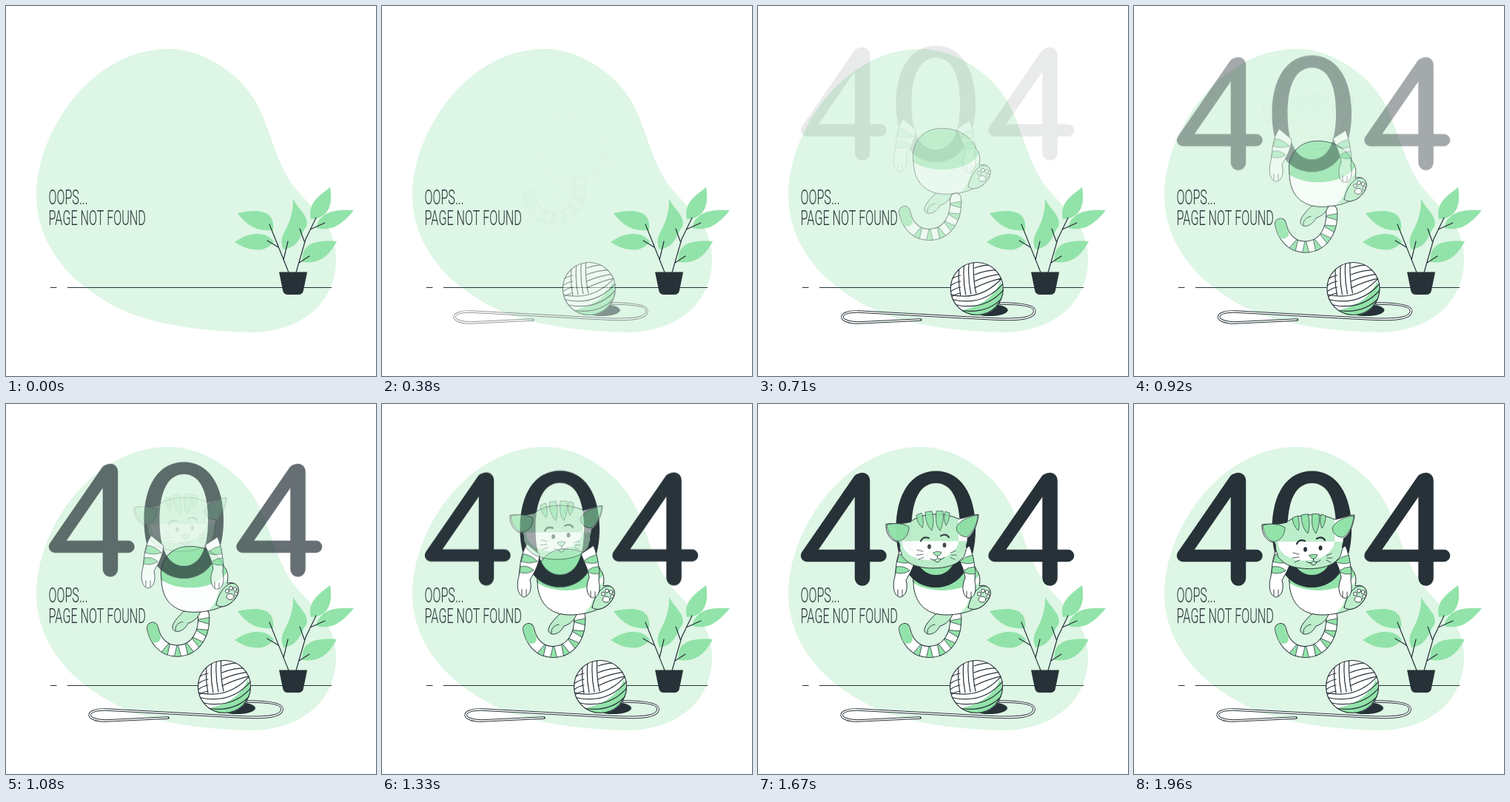
These frames come from a looping animation (500x500 px, 2000 ms). An HTML page:

```html
<!DOCTYPE html>
<html lang="en">
<head>
<meta charset="utf-8">
<title>Page not found</title>
<style>
  html, body { margin: 0; width: 100%; height: 100%; overflow: hidden; background: #fff; }
  svg { display: block; width: 100vw; height: 100vh; }
  .mint { fill: #92e3a9; }
  .tint { fill: #bdeecb; }
  .ink { fill: #263238; }
  .line { fill: none; stroke: #263238; stroke-linecap: round; stroke-linejoin: round; }
  .skin { fill: #fff; stroke: #263238; stroke-linejoin: round; stroke-linecap: round; }
  .spot { fill: #92e3a9; stroke: #263238; stroke-width: .7; stroke-linejoin: round; }
  .sign { font: 300 28px Roboto, "Open Sans", sans-serif; transform: scaleX(.578); }
</style>
</head>
<body>
<svg viewBox="0 0 500 500">
  <defs>
    <clipPath id="ballClip"><circle cx="295" cy="382" r="36"/></clipPath>
    <path id="torso" d="M210 240C206 220 219 196 248 196C276 196 291 212 295 224C301 230 300 240 299 246C307 243 315 248 314 257C312 268 302 277 290 278C282 282 268 285 254 285C226 285 210 268 210 240Z"/>
    <clipPath id="torsoClip"><use href="#torso"/></clipPath>
    <path id="skull" d="M206 160C193 164 183 161 173 163C172 174 179 187 190 187C193 192 190 197 194 202C193 206 197 209 200 212C213 226 262 227 275 210C281 206 279 201 282 196C280 191 284 187 283 182C292 176 297 162 298 150C289 150 280 155 271 156C253 147 221 147 206 160Z"/>
    <clipPath id="skullClip"><use href="#skull"/></clipPath>
    <path id="tailPath" d="M267 286C269 312 256 335 231 335C211 335 201 319 198 304"/>
    <path id="thread" d="M219 424L135 428C106 428 106 412 135 413L300 422C345 425 373 424 373 412C373 404 350 402 326 402"/>
  </defs>

  <path fill="#def6e5" d="M220 58C265 58 308 88 330 118C358 157 361 212 394 250C420 280 446 298 446 342C446 402 398 441 330 441C280 440 214 434 165 414C96 384 41 330 41 255C43 165 118 58 220 58Z"/>
  <path class="line" style="stroke-linecap:butt" d="M60 380.500H68.500M83 380.500H440"/>

  <g class="mint">
    <path d="M313 280C340 274 364 275 361 303C338 305 325 296 313 280Z"/>
    <path d="M309 319C328 305 352 303 362 319C349 335 327 331 309 319Z"/>
    <path d="M388 261C396 276 410 284 406 298C399 305 398 326 375 329C365 307 388 303 388 261Z"/>
    <path d="M438 245C442 267 437 287 412 288C407 266 424 256 438 245Z"/>
    <path d="M470 276C455 294 442 305 419 300C425 276 446 275 470 276Z"/>
    <path d="M447 318C437 337 424 349 401 346C397 320 421 316 447 318Z"/>
  </g>
  <path class="line" stroke-width="1.200" d="M382 360L356 295M368 326L353 317M375 343L381 318M392 360L405 315L419 286M396 347L410 338M403 318L397 301M411 302L431 293"/>
  <path class="ink" d="M369 359.500H407L402 384Q401 390 395 390H381Q375 390 374 384Z"/>

  <g class="ink">
    <text class="sign" x="99.500" y="268">OOPS...</text>
    <text class="sign" x="99.500" y="296">PAGE NOT FOUND</text>
  </g>

  <g id="yarn">
    <ellipse class="ink" cx="312" cy="411" rx="25" ry="8"/>
    <use href="#thread" class="line" stroke-width="3.600"/>
    <use href="#thread" fill="none" stroke="#fff" stroke-width="1.700"/>
    <circle cx="295" cy="382" r="36" fill="#fff"/>
    <g clip-path="url(#ballClip)">
      <path class="mint" d="M264 413Q314 406 327 372L340 420H264Z"/>
      <path id="strands" class="line" stroke-width="1.200"/>
    </g>
    <circle class="line" cx="295" cy="382" r="35.500" stroke-width="1.200"/>
  </g>

  <g id="tail">
    <use href="#tailPath" class="line" stroke-width="16"/>
    <use href="#tailPath" fill="none" stroke="#fff" stroke-width="14" stroke-linecap="round"/>
    <path fill="none" stroke="#92e3a9" stroke-width="14" stroke-linecap="round" d="M202 317Q199 311 198 304"/>
    <g id="rings"></g>
  </g>

  <g id="body">
    <path class="skin tint" style="fill:#bdeecb" d="M240 284C232 292 224 300 225 307C228 314 240 312 246 300C254 298 261 291 263 284Z"/>
    <path class="line" stroke-width=".9" d="M229 310C228 304 232 299 239 298"/>
    <use href="#torso" fill="#fff"/>
    <g clip-path="url(#torsoClip)">
      <ellipse class="mint" cx="249" cy="220" rx="53" ry="32"/>
      <path class="tint" d="M320 225V290H262Q282 279 286 262Q290 249 299 240Z"/>
    </g>
    <use href="#torso" class="line"/>
    <path class="skin" style="fill:#bdeecb" d="M284 275C286 263 294 249 304 246C313 245 317 254 312 263C306 273 293 282 284 275Z"/>
    <g class="skin" stroke-width=".9">
      <ellipse cx="303" cy="264" rx="5" ry="4"/>
      <circle cx="299" cy="256.500" r="2.500"/>
      <circle cx="304" cy="252.500" r="2.500"/>
      <circle cx="309.500" cy="254" r="2.500"/>
      <circle cx="311" cy="260" r="2.300"/>
    </g>
  </g>

  <g id="digits">
    <g id="four" class="line">
      <path stroke-width="16.500" d="M165.500 205H66L137 102"/>
      <path stroke-width="20.500" d="M141 103V235.500"/>
    </g>
    <use href="#four" x="253.500"/>
    <path class="ink" fill-rule="evenodd" d="M240.500 90.500C274 90.500 294 122 294 169S274 248 240.500 248S186.500 217 186.500 169S207 90.500 240.500 90.500ZM240.500 107C219 107 207.500 130 207.500 169S219 231 240.500 231S273 208 273 169S262 107 240.500 107Z"/>
    <path class="skin" d="M196 190C187 203 187 218 185 233C181 247 184 260 192 261C200 260 203 249 200 238C205 229 212 219 213 204Z"/>
    <path class="spot" d="M191 203Q201 204 210 213Q199 217 188 213ZM187 220Q197 218 205 225Q197 231 186 228Z"/>
    <path class="line" stroke-width=".9" d="M189 259V251M195 259V251"/>
    <path class="skin" d="M269 203C274 216 279 225 280 235C275 245 276 258 283 262C292 264 296 253 293 240C294 224 292 207 286 192Z"/>
    <path class="spot" d="M290 204Q280 206 272 213Q283 218 292 214ZM293 220Q284 220 277 226Q285 232 294 229Z"/>
    <path class="line" stroke-width=".9" d="M282 261V253M288 262V254"/>
  </g>

  <g id="head">
    <use href="#skull" fill="#fff"/>
    <path class="tint" clip-path="url(#skullClip)" fill-rule="evenodd" d="M186 186H290V230H186ZM195 188A38 25 -4 0 0 271 185V150H195Z"/>
    <use href="#skull" class="line"/>
    <path class="spot" d="M174 164C184 161 197 162 204 167C204 178 197 185 190 186C180 185 175 174 174 164Z"/>
    <path class="spot" d="M297 151C285 152 271 159 268 168C269 177 277 181 283 180C291 174 296 163 297 151Z"/>
  </g>

  <g id="face">
    <path class="spot" d="M214 154L221 151Q225 162 222 171Q215 165 214 154ZM226 150L235 148.500Q239 162 235 175C229 170 226 160 226 150ZM241 148.500L250 148.500Q252 162 246 175C240 169 240 158 241 148.500ZM253 149L259 151Q259 161 254 168Q250 160 253 149Z"/>
    <path class="line" stroke-width="2.200" d="M220 189Q223 182 231 185M247 182Q254 178 258 184"/>
    <ellipse class="ink" cx="231.500" cy="196.500" rx="2.400" ry="3.200"/>
    <ellipse class="ink" cx="252" cy="194.500" rx="2.400" ry="3.200"/>
    <path class="spot" d="M236.500 204.500Q242 202 248 204Q246 209.500 242.500 209.500Q239 209 236.500 204.500Z"/>
    <path class="line" d="M242.500 209V212Q239 217 233 213M242.500 212Q247 216 252 211M238 215Q243 221 247 214"/>
    <path class="line" stroke-width=".8" d="M215 201L223 203M214 208L223 207M217 214L224 211M260 205L267 202M261 208L268 208M260 211L266 214"/>
  </g>
</svg>
<script>
  const LOOP = 2000;
  const el = id => document.getElementById(id);
  const clamp = v => Math.min(1, Math.max(0, v));
  const each = (n, make) => Array.from({ length: n }, (_, i) => make(i)).join("");

  el("strands").setAttribute("d",
    each(4, i => `M${273 + i * 6} 340q-${5 - i} 26 ${i} ${51 - i}`) +
    each(4, i => `M258 ${371 + i * 8}Q266 ${365 + i * 8} 273 ${364 + i * 8}`) +
    each(4, i => `M292 ${354 + i * 9}Q312 ${347 + i * 8} 333 ${352 + i * 5}`) +
    each(5, i => `M${256 + i * 3} ${389 + i * 7}Q${302 + i * 3} ${402 + i * 6} 334 ${362 + i * 9}`));

  // Tapered rings pointing inward along the tail.
  const curve = el("tailPath"), length = curve.getTotalLength();
  el("rings").innerHTML = each(6, i => {
    const at = 8 + i * 15, p = curve.getPointAtLength(at), q = curve.getPointAtLength(at + 1);
    const turn = Math.atan2(q.y - p.y, q.x - p.x) * 180 / Math.PI;
    return at < length - 18
      ? `<path class="spot" transform="translate(${p.x} ${p.y}) rotate(${turn})" d="M-4.500 -7.500H4.500L1 7H-1Z"/>` : "";
  });

  const smooth = x => x * x * (3 - 2 * x);

  // cubic-bezier(.36, -.01, .5, 1.38)
  function overshoot(x) {
    const bez = (a, b, s) => 3 * (1 - s) ** 2 * s * a + 3 * (1 - s) * s * s * b + s ** 3;
    let lo = 0, hi = 1;
    for (let i = 0; i < 20; i++) {
      const mid = (lo + hi) / 2;
      if (bez(.36, .5, mid) < x) lo = mid; else hi = mid;
    }
    return bez(-.01, 1.38, hi);
  }

  const parts = [
    { id: "yarn", start: 0, span: 1000, dx: -30, dy: 0, ease: overshoot },
    { id: "tail", start: 272, span: 900, dx: 0, dy: -50, ease: smooth },
    { id: "body", start: 330, span: 900, dx: 0, dy: -50, ease: smooth },
    { id: "digits", start: 550, span: 830, dx: 0, dy: -41, ease: smooth },
    { id: "head", start: 820, span: 940, dx: 0, dy: -29, ease: smooth },
    { id: "face", start: 870, span: 1030, dx: 0, dy: -30, ease: smooth }
  ].map(part => ({ ...part, node: el(part.id) }));

  const HOLD = 130;
  function draw(now) {
    const t = now % LOOP;
    for (const { node, start, span, dx, dy, ease } of parts) {
      const p = t < HOLD ? 0 : ease(clamp((t - start) / span));
      node.setAttribute("opacity", clamp(p));
      node.setAttribute("transform", `translate(${dx * (1 - p)} ${dy * (1 - p)})`);
    }
    requestAnimationFrame(() => draw(performance.now()));
  }
  draw(performance.now());
</script>
</body>
</html>
```
